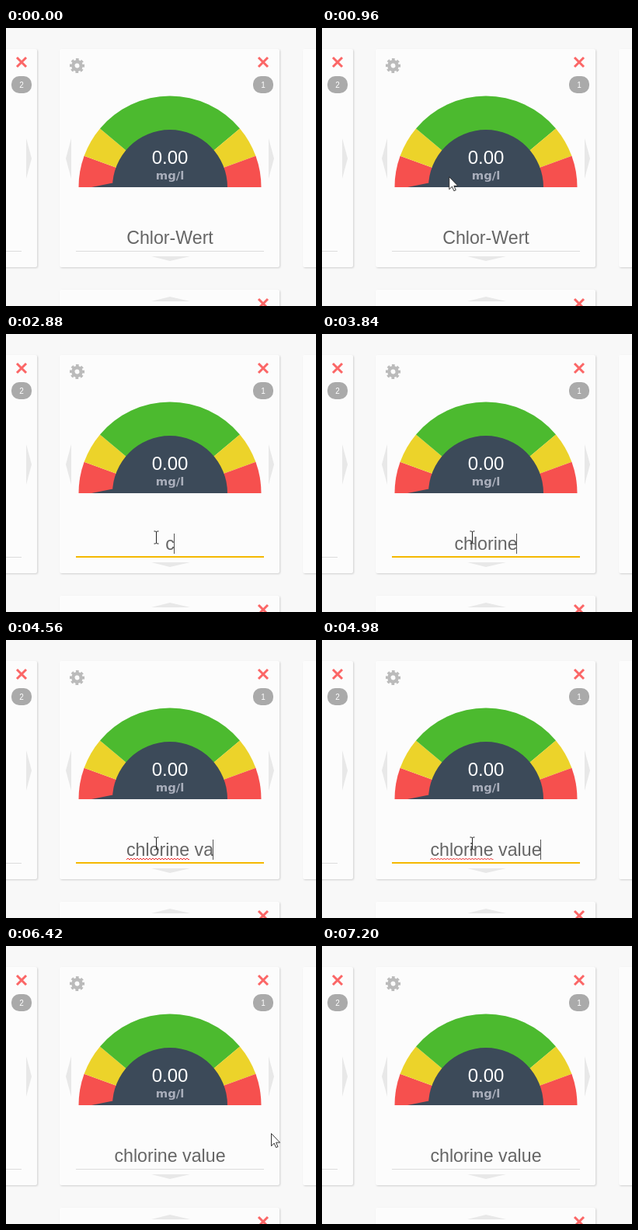
Write an HTML page that moves like this. It is 399 by 358 pixels and loops after 7560 ms.

```html
<!DOCTYPE html>
<html lang="en">
<head>
<meta charset="utf-8">
<title>Editing a gauge label</title>
<style>
  html, body { margin: 0; width: 100%; height: 100%; overflow: hidden; background: #f8f8f8; }
  svg { display: block; font-family: "Liberation Sans", Arial, sans-serif; }
  .card { fill: #fcfcfc; filter: drop-shadow(1px 1px 1px rgba(0, 0, 0, .16)); }
  .grip { fill: #e8e8e8; }
  .line { fill: #dcdcdc; }
  #label { font-size: 23.2px; fill: #666; white-space: pre; }
  #picked { fill: #fff; }
</style>
</head>
<body>
<svg width="399" height="358" viewBox="0 0 399 358">
  <defs>
    <path id="close" d="M-6-6 6 6M6-6-6 6" stroke="#fb6666" stroke-width="3"/>
    <rect id="badge" x="-13" y="-11" width="26" height="22" rx="10" fill="#aaa"/>
  </defs>

  <g class="card">
    <rect x="-240" y="27" width="280" height="281" rx="2"/>
    <rect x="69" y="27" width="283" height="281" rx="2"/>
    <rect x="382" y="27" width="283" height="281" rx="2"/>
    <rect x="69" y="337" width="283" height="281" rx="2"/>
  </g>
  <path class="grip" d="M26 142l7 26-7 26zM338 142l7 26-7 26zM84 142l-7 26 7 26zM187 294h50l-26 6zM187 352h50l-26-6z"/>
  <rect class="line" y="287" width="20" height="1"/>
  <use href="#close" x="20" y="44"/>
  <use href="#close" x="331" y="44"/>
  <use href="#close" x="331" y="355"/>
  <use href="#badge" x="20" y="73"/>
  <use href="#badge" x="331" y="73"/>
  <g fill="#fff" font-size="10" text-anchor="middle">
    <text x="20" y="76.5">2</text>
    <text x="331" y="76.5">1</text>
  </g>
  <g fill="none" stroke="#bbb" transform="translate(91.5 48.5) rotate(-12)">
    <circle r="5.2" stroke-width="4.4"/>
    <circle r="8" stroke-width="3.2" stroke-dasharray="3.5 2.783"/>
  </g>

  <g id="gauge"></g>
  <path fill="#3c4a59" d="M137 205a74 74 0 0 1 148 0zM110 205l30-6v6z"/>
  <g text-anchor="middle">
    <text x="211" y="175" font-size="24" fill="#fff">0.00</text>
    <text x="211" y="195" font-size="14.8" font-weight="bold" fill="#a9aebb" style="font-family:'DejaVu Sans',sans-serif">mg/l</text>
  </g>

  <rect class="line" x="90" y="287" width="242" height="1"/>
  <rect id="focus" y="286" height="2" fill="#f5b800"/>
  <rect id="selection" y="257" height="26" fill="#3390ff"/>
  <text id="label" y="278"><tspan id="picked"></tspan><tspan id="plain"></tspan></text>
  <path id="squiggle" fill="none" stroke="#e22"/>
  <rect id="caret" y="257" width="1" height="26" fill="#555"/>
  <g id="cursor">
    <path id="beam" fill="none" stroke="#222" d="M-3-8h2l1 1 1-1h2M0-7V7M-3 8h2l1-1 1 1h2"/>
    <path id="arrow" fill="#fff" stroke="#222" stroke-width=".9" d="M.5.5v16l3.7-3.5 2.4 5.5 2.4-1-2.4-5.4h5z"/>
  </g>
</svg>
<script>
const $ = id => document.getElementById(id);
const LOOP = 7560, STEP = 60, MID = 211;
const BEFORE = "Chlor-Wert", AFTER = "chlorine value";
const FOCUS = 1140, WORD = 1440, ALL = 1620, BLUR = 6360;
const keys = [2880, 2940, 3180, 3360, 3540, 3660, 3720, 3840, 4020, 4380, 4560, 4680, 4920, 4980];
// time, x, y of the pointer
const route = [
  [540, 329, 95], [780, 158, 69], [1020, 165, 232], [1200, 193.5, 262],
  [5460, 193.5, 262], [5820, 310.5, 277], [5940, 310.5, 277],
  [6300, 341, 241], [6660, 341, 241], [6840, 333, 190], [7140, 397, 59]
];

const show = (id, on) => $(id).setAttribute("visibility", on ? "visible" : "hidden");
const set = (id, attrs) => {
  for (const name in attrs) $(id).setAttribute(name, attrs[name]);
};

function sector(from, to, color) {
  const at = deg => {
    const a = deg * Math.PI / 180;
    return `${MID - 117.5 * Math.cos(a)} ${205 - 117.5 * Math.sin(a)}`;
  };
  return `<path fill="${color}" d="M${MID} 205L${at(from)}A117.5 117.5 0 0 1 ${at(to)}z"/>`;
}
const red = "#f6504e", yellow = "#ecd32a", green = "#4cba2f";
$("gauge").innerHTML = sector(0, 20, red) + sector(20, 40, yellow) +
  sector(40, 140, green) + sector(140, 160, yellow) + sector(160, 180, red);
set("squiggle", { d: "M0 283" + "l2-2 2 2".repeat(20) + "l1-1" });

function pointer(t) {
  const i = Math.max(1, route.findIndex(p => p[0] >= t));
  const [t0, x0, y0] = route[i - 1], [t1, x1, y1] = route[i];
  const k = (t - t0) / (t1 - t0);
  return [x0 + (x1 - x0) * k, y0 + (y1 - y0) * k];
}

function drawLabel(t) {
  const typed = keys.filter(k => k <= t).length;
  const text = typed ? AFTER.slice(0, typed) : BEFORE;
  const count = typed || t < WORD ? 0 : t < ALL ? 5 : text.length;
  $("picked").textContent = text.slice(0, count);
  $("plain").textContent = text.slice(count);
  const width = $("label").getComputedTextLength(), left = MID - width / 2;
  set("label", { x: left });
  set("selection", { x: left, width: count ? $("label").getSubStringLength(0, count) : 0 });

  const focused = t >= FOCUS && t < BLUR;
  show("squiggle", focused && text.includes(" "));
  set("squiggle", { transform: `translate(${left} 0)` });

  const clicked = t >= 1260 && t < WORD;
  const blinkOff = t >= 5520 && t < 6000;
  show("caret", clicked || (typed && focused && !blinkOff));
  set("caret", { x: clicked ? 190 : Math.floor(width / 2 + 210.3) });

  const k = Math.min(1, (t - FOCUS + STEP) / 240);
  const span = focused ? 242 * (1 - (1 - k) ** 3) : 0;
  set("focus", { x: MID - span / 2, width: span });
}

function drawPointer(t) {
  const on = t >= 540 && t < 7200;
  const [x, y] = on ? pointer(t) : [0, 0];
  const overInput = x > 90 && x < 332 && y > 252 && y < 288;
  set("cursor", { transform: `translate(${x} ${y})` });
  show("beam", on && overInput);
  show("arrow", on && !overInput);
}

const start = performance.now();
function frame() {
  const t = Math.floor((performance.now() - start) % LOOP / STEP) * STEP;
  drawLabel(t);
  drawPointer(t);
  requestAnimationFrame(frame);
}
frame();
</script>
</body>
</html>
```
